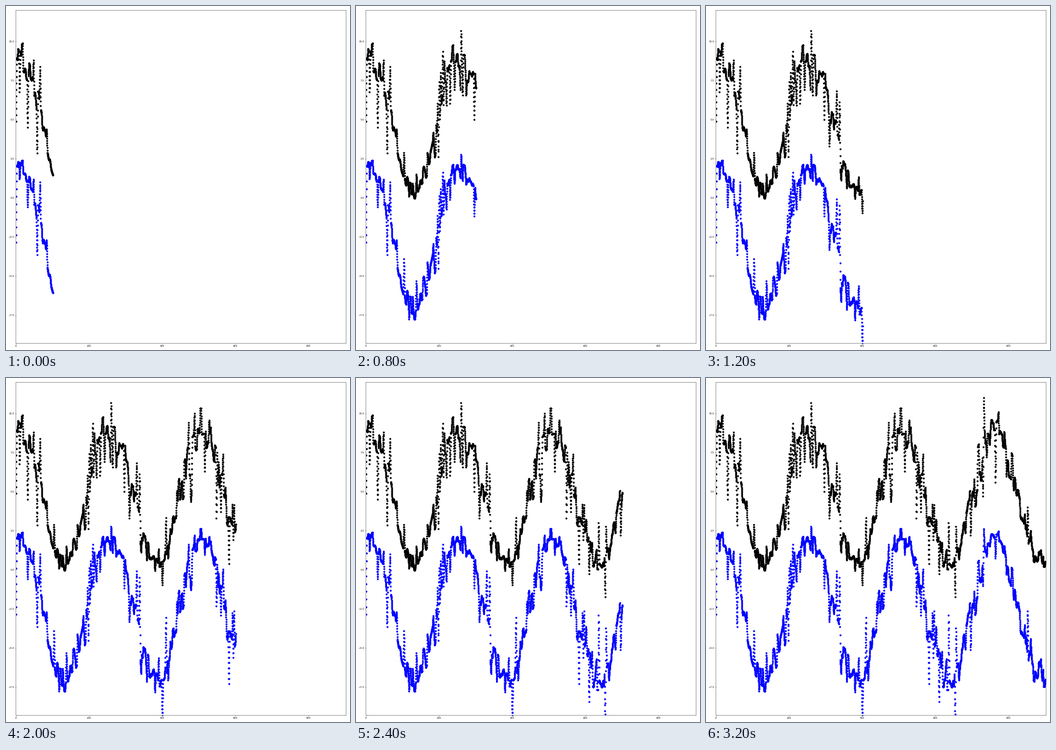
Recreate the animation shown at these times as a matplotlib script. Size 748x748 px, loop 3.6 s.

```python
import numpy as np
import matplotlib.pyplot as plt
from matplotlib.animation import FuncAnimation

SIZE, DPI = 748, 100
PT = 72 / DPI          # points per pixel
STEP, SUB = 2, 10      # knot spacing, dots per knot interval
REVEAL, FRAMES = 100, 9

# the most prominent peaks and dips of the upper series
KEYS = [(0, 4.9), (18, 9.9), (32, 4.5), (48, 8.8), (105, 2.9), (183, 4.2),
        (204, 8), (261, 10.7), (295, 5), (332, 4), (480, 5.1), (489, 10),
        (548, 3.3), (591, 4.2), (732, 11), (764, 5.6), (771, 10.1), (851, 4)]


def make_series():
    rng = np.random.default_rng(12)
    knots = np.arange(0, 908, STEP)
    n = len(knots)
    c = np.cos((knots - 8) / 40)
    s = np.abs(np.sin((knots - 8) / 40))

    # short plateaus, plus spikes that mostly point to the middle
    noise = np.repeat(rng.normal(size=n // 2 + 1), 2)[:n]
    noise *= .4 + .1 * c + .25 * s
    toward = np.where(rng.random(n) < (1 + c) / 2, -1, 1)
    spikes = toward * np.minimum(rng.exponential(1 + .2 * c), 2.6)
    noise += np.where(rng.random(n) < .3, spikes, 0)

    level = 4.7 + 4.3 * c
    for x, y in KEYS:
        i = round(x / STEP)
        noise[i] = y - level[i]
    upper = level + noise
    # the lower series reacts weakly at its crests, strongly in its troughs
    lower = -2.5 + 4.6 * c + (1 - .6 * c) * noise
    lower[0] = -2.86

    x = np.linspace(0, knots[-1], SUB * (n - 1) + 1)
    return x, np.interp(x, knots, upper), np.interp(x, knots, lower)


x, upper, lower = make_series()

fig = plt.figure(figsize=(SIZE / DPI, SIZE / DPI), dpi=DPI, facecolor="white")
ax = fig.add_axes([21.5 / SIZE, 14.5 / SIZE, 718 / SIZE, 724 / SIZE])
ax.set(xlim=(0, 902.5), ylim=(-9.31, 12.0),
       xticks=range(0, 801, 200), yticks=np.arange(-7.5, 10.1, 2.5))
ax.tick_params(labelsize=5 * PT, length=1.8 * PT, width=.5 * PT,
               pad=1.8 * PT, labelfontfamily="DejaVu Sans")
for spine in ax.spines.values():
    spine.set_linewidth(.5 * PT)
    spine.set_snap(False)

style = dict(ls="none", marker="o", ms=3.6 * PT, mew=.5 * PT)
top_dots, = ax.plot([], [], color="black", **style)
low_dots, = ax.plot([], [], color="blue", **style)


def update(frame):
    n = np.searchsorted(x, REVEAL * (frame + 1) + 1.2)
    top_dots.set_data(x[:n], upper[:n])
    low_dots.set_data(x[:n], lower[:n])
    return top_dots, low_dots


anim = FuncAnimation(fig, update, frames=FRAMES, interval=400,
                     repeat=True, repeat_delay=0, blit=False)
plt.show()
```
